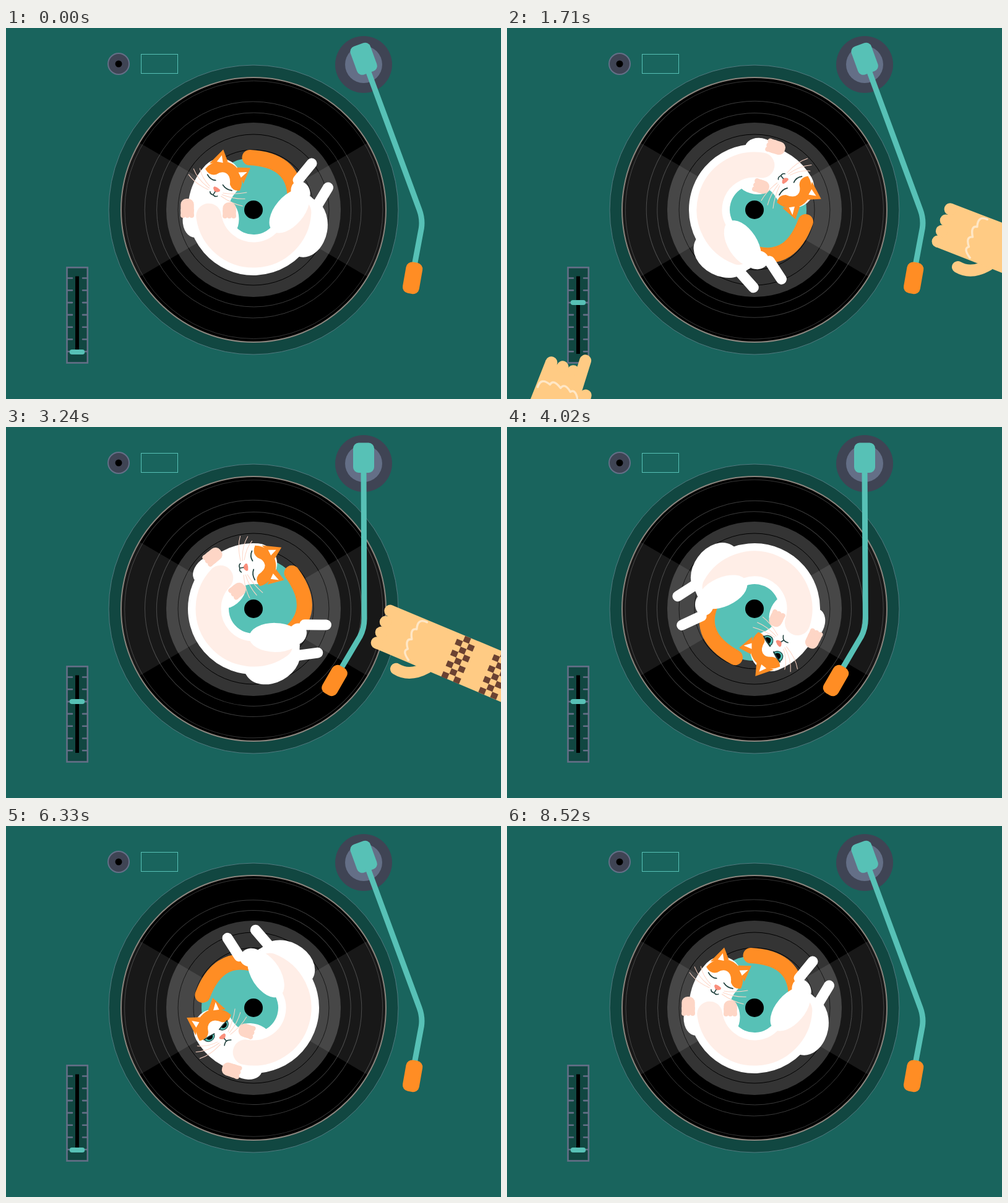
Animation, 800 px wide and 600 px high, one loop 8550 ms. Source, as an HTML page:

```html
<!DOCTYPE html>
<html lang="en">
<head>
<meta charset="utf-8">
<title>Cat on a turntable</title>
<style>
  html, body { margin: 0; width: 100%; height: 100%; overflow: hidden; background: #19645d; }
  svg { display: block; width: 800px; height: 600px; }
  .line { fill: none; stroke-linecap: round; stroke-linejoin: round; }
</style>
</head>
<body>
<svg id="stage" viewBox="0 0 800 600" xmlns="http://www.w3.org/2000/svg"></svg>
<script>
const LOOP = 8550;
const CX = 400, CY = 294;
const PIVOT = { x: 578, y: 49.5 };
const TEAL = '#57c1b6', SLATE = '#646f87', NAVY = '#3f4454', DEEP = '#114741';
const ORANGE = '#ff8d24', PINK = '#fed6c6', SKIN = '#ffcb84', BROWN = '#6b4232', INK = '#1f403d';

// ---- drawing helpers ----
const rad = a => a * Math.PI / 180;
const polar = (r, a) => `${(CX + r * Math.cos(rad(a))).toFixed(2)} ${(CY + r * Math.sin(rad(a))).toFixed(2)}`;
const arc = (r, from, to) =>
  `M${polar(r, from)}A${r} ${r} 0 ${Math.abs(to - from) > 180 ? 1 : 0} ${to > from ? 1 : 0} ${polar(r, to)}`;
const circle = (x, y, r, fill, extra = '') => `<circle cx="${x}" cy="${y}" r="${r}" fill="${fill}" ${extra}/>`;
const ellipse = (x, y, rx, ry, turn = 0, fill = '#fff') =>
  `<ellipse cx="${x}" cy="${y}" rx="${rx}" ry="${ry}" fill="${fill}" transform="rotate(${turn} ${x} ${y})"/>`;
const rect = (x, y, w, h, r, fill, extra = '') =>
  `<rect x="${x}" y="${y}" width="${w}" height="${h}" rx="${r}" fill="${fill}" ${extra}/>`;
const line = (d, stroke, width, extra = '') =>
  `<path class="line" d="${d}" stroke="${stroke}" stroke-width="${width}" ${extra}/>`;
const shape = (d, fill) => `<path d="${d}" fill="${fill}"/>`;
const group = (id, inner) => `<g id="${id}">${inner}</g>`;

function deck() {
  const ring = (r, color, dx = 0) => circle(CX + dx, CY, r, 'none', `stroke="${color}"`);
  const wedge = side => {
    const [a, b] = side < 0 ? [149.5, 210.5] : [-30.5, 30.5];
    return `<path d="${arc(213, a, b)}L${CX} ${CY}Z" fill="#fff" opacity=".095"/>`;
  };
  return circle(182, 58, 17, NAVY, `stroke="${SLATE}" stroke-width="2"`)
    + circle(182, 58, 5.5, '#000')
    + rect(218.5, 42.5, 59, 31, 0, 'none', `stroke="${TEAL}"`)
    + circle(CX, CY, 234, DEEP, 'stroke="#527b80"')
    + circle(CX, CY, 214, '#000', 'stroke="#8a857e" stroke-width="2"')
    + circle(CX, CY, 141, '#343434')
    + group('grooves', ring(208.5, '#333', .4) + ring(175, '#3a3a3a', -.8) + ring(157, '#3a3a3a', .6))
    + ring(122, '#000') + ring(97, '#000')
    + wedge(-1) + wedge(1)
    + circle(CX, CY, 84, TEAL);
}

function slider() {
  let ticks = '';
  for (let i = 0; i < 7; i++) {
    const y = 404.5 + i * 19.8;
    ticks += `M99 ${y}H107M124 ${y}H131`;
  }
  return rect(98.5, 387.3, 33.3, 154.2, 0, DEEP, `stroke="${SLATE}" stroke-width="2.6"`)
    + line(ticks, SLATE, 2.6)
    + rect(112, 401.5, 6, 125.5, 0, '#000')
    + group('knob', rect(102.7, -4, 24.6, 8, 4, TEAL));
}

function paw(x, y, h) {
  const toes = [-7, 0, 7].map(dx => circle(x + dx, y + h - 4, 4, PINK)).join('');
  return rect(x - 10.7, y, 21.4, h - 2, 9.5, PINK) + rect(x - 10.7, y + h - 14, 21.4, 10, 0, PINK) + toes;
}

function head() {
  const whiskers = [
    'M-11 24Q-35 27-51 20', 'M-11 21Q-33 20-49 8', 'M-12 18Q-31 13-41 2',
    'M12 22Q34 23 50 17', 'M12 19Q33 15 47 5', 'M12 16Q30 8 44-5'
  ].join('');
  const eye = x => `<g class="eye" data-x="${x}">`
    + shape('M-9-1A9 10 0 0 0 9-1Z', TEAL)
    + shape('M-5-1A5.5 7 0 0 0 6-1Z', '#000')
    + line('M-9-1A9 10 0 0 0 9-1', INK, 1.2)
    + line('M-9.5-1Q0-2.5 9.5-1', INK, 2.2) + '</g>';
  return `<g transform="translate(349 247) rotate(32)">`
    + shape('M-32-13L-25-44L-8-31ZM9-31L28-42L32-14Z', ORANGE)
    + shape('M-33-2A33.3 34.5 0 0 1 33-2Q23 6 14-2Q8-14 0-14Q-8-14-13-4Q-21 5-33-2Z', ORANGE)
    + shape('M-22-35L-23.5-22L-14-25.5ZM27-33.5L15.5-25.5L23.5-20.5Z', '#fff')
    + group('whiskers', line(whiskers, PINK, 1))
    + group('asleep', line('M-25 4Q-17 9-9 5M5 5Q13 9 22 5', INK, 1.8))
    + group('awake', eye(-17) + eye(13))
    + shape('M-5 14Q0 12.5 5 14Q7 16 5 18L2 20.5Q0 22-2 20.5L-5 18Q-7 16-5 14Z', '#fa8f7c')
    + line('M0 21V26', INK, 1.6)
    + `<path id="mouth" class="line" stroke="${INK}" stroke-width="1.6"/></g>`;
}

function cat() {
  return line('M394 209.5Q463 213 467 268', ORANGE, 25)
    + line('M520.5 258L500 292', '#fff', 17)
    + ellipse(484, 323, 35.5, 48, 10)
    + ellipse(305, 311, 19.5, 28)
    + line(arc(73, 223, 4), '#fff', 66)
    + ellipse(356, 309, 20.5, 30)
    + line(arc(73, 172, 3), '#ffeee7', 41)
    + ellipse(458, 296, 42, 23.5, -50)
    + ellipse(476, 265, 15, 18, -25)
    + line('M494 219L472 246', '#fff', 17)
    + paw(293, 276, 31) + paw(361, 282, 26)
    + head();
}

function tonearm() {
  return circle(578, 59, 46, NAVY) + circle(578, 59, 30, SLATE)
    + group('arm', rect(561, 25.5, 34, 48.5, 9, TEAL)
      + line('M578 70L579 310Q579 326 572 339L543 388', TEAL, 9, 'style="stroke-linecap:butt"')
      + rect(517.5, 384.5, 27, 51, 10, ORANGE, 'transform="rotate(30 531 410)"'));
}

// Arm lies along +x with the fingers at the origin.
function hand(pointing) {
  const shift = pointing ? -17 : 0;
  let cells = '';
  for (const band of [125, 190, 255])
    for (let row = 0; row < 8; row++)
      for (let col = 0; col < 3; col++)
        if ((row + col) % 2) cells += `M${band + col * 10.4} ${-39.5 + row * 9.5}h10.4v9.5h-10.4z`;
  let fingers = '';
  [-30, -10.5, 8, 26].forEach((v, i) => {
    if (!pointing || i < 3) fingers += circle(8, v, 9.7, SKIN);
  });
  if (pointing) fingers += line('M-15 20L40 24', SKIN, 19);
  const thumb = pointing ? 'translate(-16 -12)' : '';
  return line('M53 53Q78 57 98 32', SKIN, 19, `transform="${thumb}"`)
    + shape(`M8-39.7H340V37.5L${pointing ? 60 : 100} ${pointing ? 33 : 36}L8 ${pointing ? 20 : 35.5}Z`, SKIN)
    + fingers
    + `<g transform="translate(${shift} 0)">`
    + line('M70-36Q53-37 59-19Q48-17 58-1Q47 2 58 16Q50 22 66 32', '#ffe7c6', 3.4)
    + shape(cells, BROWN) + '</g>';
}

const stage = document.getElementById('stage');
stage.innerHTML = deck() + group('cat', cat()) + circle(CX, CY, 15, '#000') + slider() + tonearm()
  + group('rightHand', hand(false)) + group('leftHand', hand(true));

// ---- motion ----
const part = {};
stage.querySelectorAll('[id]').forEach(el => part[el.id] = el);
const eyes = [...stage.querySelectorAll('.eye')];
const move = (el, value) => el.setAttribute('transform', value);
const show = (el, on) => el.setAttribute('display', on ? 'inline' : 'none');

const span = (t, a, b) => Math.min(1, Math.max(0, (t - a) / (b - a)));
const mix = (a, b, k) => a + (b - a) * k;
const smooth = k => k < .5 ? 2 * k * k : 1 - 2 * (1 - k) * (1 - k);
const outPow = (k, p) => 1 - Math.pow(1 - k, p);

const RATE = 1080 / 5441;   // degrees per ms
const SPIN = { start: 870, full: 1470, slow: 5871, fade: 1850 };

function spinAngle(t) {
  const ramp = SPIN.full - SPIN.start;
  if (t < SPIN.start) return 0;
  if (t < SPIN.full) return RATE * (t - SPIN.start) ** 2 / (2 * ramp);
  const steady = RATE * (Math.min(t, SPIN.slow) - SPIN.start - ramp / 2);
  return steady + RATE * SPIN.fade / 2.5 * outPow(span(t, SPIN.slow, SPIN.slow + SPIN.fade), 2.5);
}

function armAngle(t) {
  const on = smooth(span(t, 1900, 2700)), off = smooth(span(t, 5250, 5950));
  const bob = t > 2900 && t < 5250 ? .2 * Math.sin((t - 3240) / 1815 * 2 * Math.PI) : 0;
  return -20 * (1 - on + off) - bob;
}

function shellShift(angle) {
  const a = rad(angle), x = -47, y = 360.5;
  return [x * Math.cos(a) - y * Math.sin(a) - x, x * Math.sin(a) + y * Math.cos(a) - y];
}

function knobY(t) {
  return 524 - 80 * (smooth(span(t, 870, 1470)) - smooth(span(t, 5450, 6060)));
}

function placeRightHand(t) {
  show(part.rightHand, t > 1380 && t < 3490);
  const [sx, sy] = shellShift(armAngle(Math.min(t, 2800)));
  const come = 1 - outPow(span(t, 1380, 1860), 1.82);
  const go = Math.pow(span(t, 2900, 3480), 3.3);
  const x = -50 + sx + 184 * come + 300 * go;
  const y = 2 + sy - 2 * come - 12 * go;
  const turn = mix(21, 22.7, span(t, 1710, 2700));
  move(part.rightHand, `translate(${600 + x} ${322 + y}) rotate(${turn})`);
}

function placeLeftHand(t) {
  show(part.leftHand, t > 250 && t < 2000);
  const come = 1 - outPow(span(t, 250, 840), 2);
  const go = Math.pow(span(t, 1470, 1960), 1.3);
  const x = -10 - 90 * come + 24 * go;
  const y = knobY(t) - 529 + 120 * come + 205 * go;
  const turn = -7 * span(t, 500, 870) * (1 - span(t, 1470, 1710)) + 4 * come;
  move(part.leftHand, `translate(${x} ${y}) rotate(${turn} 128 533) translate(103 548) rotate(111.5) scale(1 -1)`);
}

function setFace(t) {
  const open = span(t, 3420, 3540) - .25 * span(t, 5300, 5450) - .75 * span(t, 7000, 7120);
  const tilt = 9 * span(t, 5300, 5450);
  const awake = open > .12;
  show(part.awake, awake);
  show(part.asleep, !awake);
  eyes.forEach(eye => {
    const x = +eye.dataset.x;
    move(eye, `translate(${x} ${3 + 2 * (1 - open)}) rotate(${x < 0 ? tilt : -tilt}) scale(1 ${Math.max(open, .1)})`);
  });
  part.mouth.setAttribute('d', awake ? 'M-7 29.5Q-3 26 0 26Q3 26 7 29.5' : 'M-7 25Q-5 28.5 0 27Q5 28.5 7 25');
  const twitch = t < 870 ? 3 * Math.sin(t / 870 * 4 * Math.PI) : 0;
  move(part.whiskers, `rotate(${twitch} 0 19)`);
}

function draw(t) {
  const spin = `rotate(${spinAngle(t) % 360} ${CX} ${CY})`;
  move(part.cat, spin);
  move(part.grooves, spin);
  move(part.knob, `translate(0 ${knobY(t)})`);
  move(part.arm, `rotate(${armAngle(t)} ${PIVOT.x} ${PIVOT.y})`);
  placeRightHand(t);
  placeLeftHand(t);
  setFace(t);
}

const began = performance.now();
function tick() {
  draw((performance.now() - began) % LOOP);
  requestAnimationFrame(tick);
}
tick();
</script>
</body>
</html>
```
